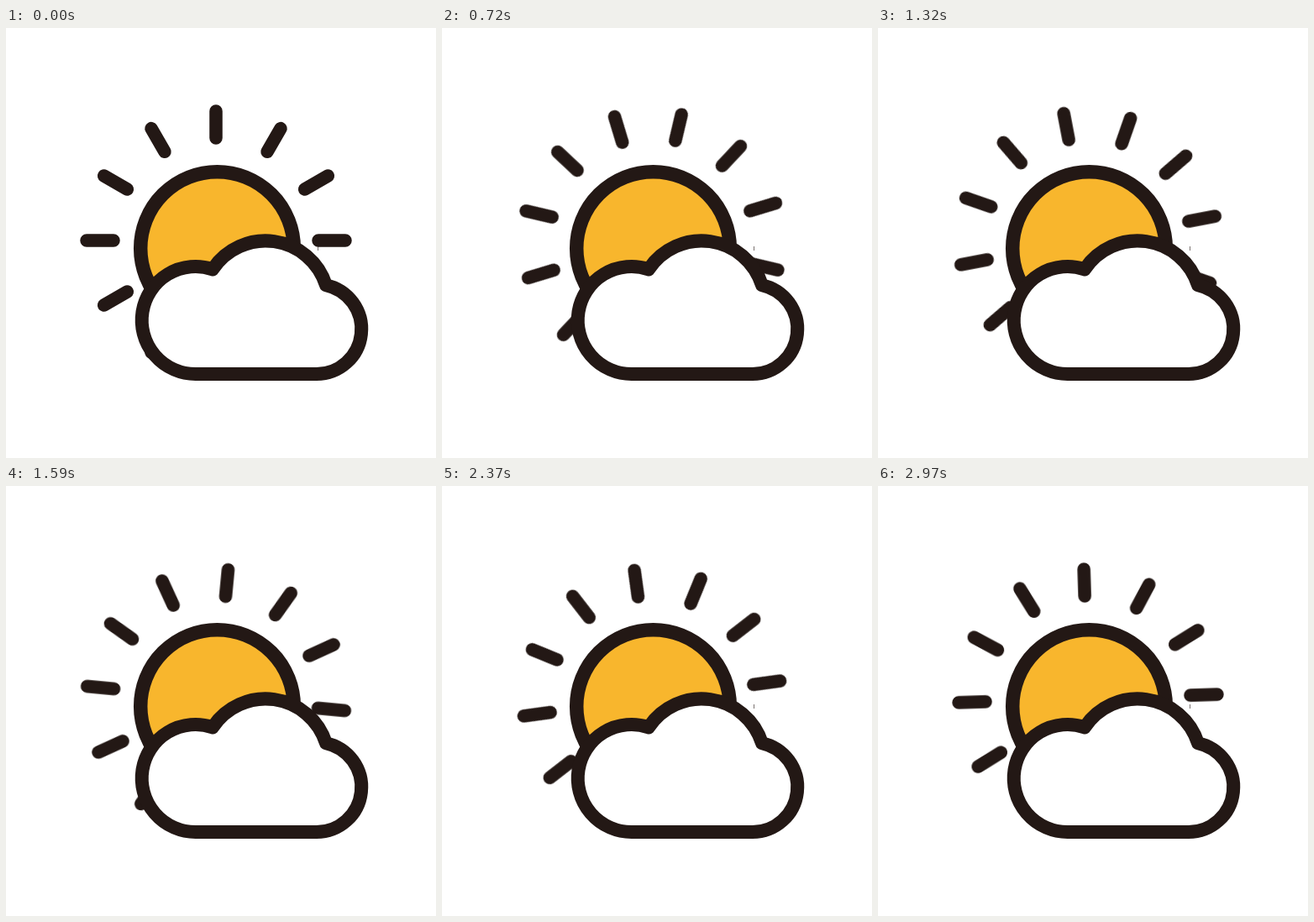
Animation of 512x512 px, one loop 3 s. Source, as an HTML page:

```html
<!DOCTYPE html>
<html lang="en">
<head>
<meta charset="utf-8">
<title>Sun behind a cloud</title>
<style>
  html, body { margin: 0; width: 100%; height: 100%; overflow: hidden; background: #fff; }
  svg { display: block; width: 100vw; height: 100vh; }
  .ink { stroke: #231815; stroke-width: 16; stroke-linecap: round; stroke-linejoin: round; }
  .rays {
    stroke-width: 15.5;
    transform-origin: 250px 253px;
    animation: turn 3s steps(100) infinite;
  }
  @keyframes turn { to { transform: rotate(180deg); } }
</style>
</head>
<body>
<svg viewBox="0 0 512 512">
  <defs>
    <!-- two opposite rays -->
    <path id="pair" d="M250 99v32M250 375v32"/>
  </defs>
  <g class="ink rays">
    <use href="#pair"/>
    <use href="#pair" transform="rotate(30 250 253)"/>
    <use href="#pair" transform="rotate(60 250 253)"/>
    <use href="#pair" transform="rotate(90 250 253)"/>
    <use href="#pair" transform="rotate(120 250 253)"/>
    <use href="#pair" transform="rotate(150 250 253)"/>
  </g>
  <circle class="ink" cx="251.5" cy="262.5" r="91.3" fill="#f8b62d" style="stroke-width:16.5"/>
  <rect x="371" y="260" width="1" height="5" fill="#231815" opacity=".6"/>
  <path class="ink" fill="#fff" d="M226 412A64 64 0 1 1 246 287.3A75.5 75.5 0 0 1 381 306.2A53.5 53.5 0 0 1 369.5 412Z"/>
</svg>
</body>
</html>
```
